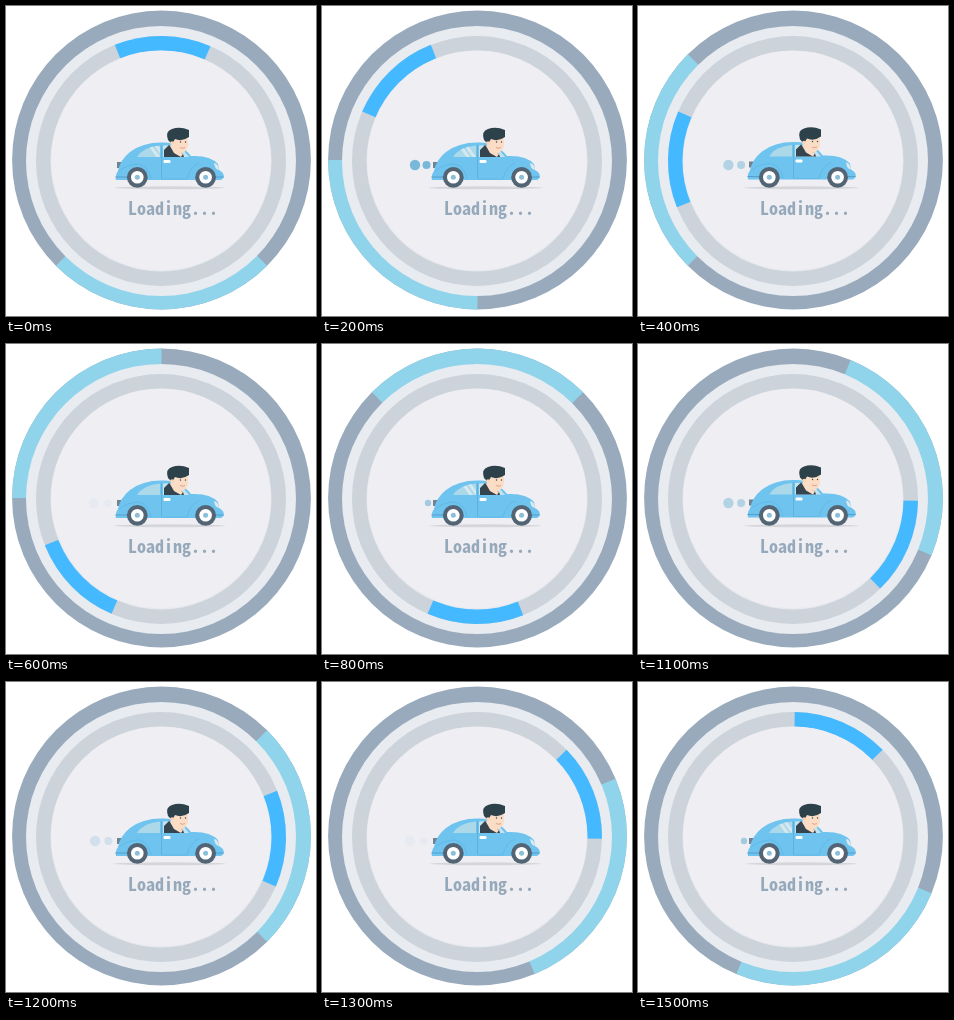
An HTML page with a canvas for the animation above (1600 ms loop, 310 px wide and 310 px high).

```html
<!DOCTYPE html>
<html lang="en">
<head>
<meta charset="utf-8">
<title>Loading</title>
<style>
  html, body { margin: 0; width: 100%; height: 100%; overflow: hidden; background: #fff; }
  canvas { display: block; width: 310px; height: 310px; }
</style>
</head>
<body>
<canvas id="stage"></canvas>
<script>
const STEP = 100, STEPS = 16, TURN = 22.5, PUFF_CYCLE = 7;
const canvas = document.getElementById('stage');
const ctx = canvas.getContext('2d');
const ratio = window.devicePixelRatio || 1;
canvas.width = canvas.height = 310 * ratio;
ctx.scale(ratio, ratio);

function disc(x, y, r, color) {
  ctx.fillStyle = color;
  ctx.beginPath();
  ctx.arc(x, y, r, 0, Math.PI * 2);
  ctx.fill();
}

function shape(path, color) {
  ctx.fillStyle = color;
  ctx.fill(new Path2D(path));
}

function line(path, color, width) {
  ctx.strokeStyle = color;
  ctx.lineWidth = width;
  ctx.stroke(new Path2D(path));
}

// Angles are in degrees, clockwise from the top.
function sector(x, y, r, middle, span, color) {
  const rad = a => (a - 90) * Math.PI / 180;
  ctx.fillStyle = color;
  ctx.beginPath();
  ctx.moveTo(x, y);
  ctx.arc(x, y, r, rad(middle - span / 2), rad(middle + span / 2));
  ctx.fill();
}

function drawRings(n) {
  disc(155.5, 154, 149.4, '#98aabb');
  sector(155.5, 154, 149.4, 180 + n * TURN, 90, '#8fd4eb');
  disc(155, 155, 135, '#e8ebf0');
  disc(155, 155, 125, '#ccd3da');
  sector(155, 155, 125, 0.8 - n * TURN, 45, '#45b9ff');
  disc(155, 155, 110.5, '#e6e9ee');
  disc(155, 154.5, 109.8, '#efeef3');
}

function drawPuffs(phase) {
  if (phase === 0) return;
  ctx.save();
  if (phase === 1) {
    ctx.globalAlpha = 0.65;
    disc(106, 159, 3.2, '#78b8d8');
  } else {
    const age = phase - 2;
    ctx.globalAlpha = [1, 0.75, 0.5, 0.25, 0.06][age];
    disc(93 - age * 1.3, 159, 5.2, '#78b8d8');
    disc(104.5 - age * 0.7, 159, 4, '#78b8d8');
  }
  ctx.restore();
}

function drawWheel(x) {
  disc(x, 171.3, 10.4, '#536574');
  disc(x, 171.3, 6.3, '#fff');
  disc(x, 171.3, 2.5, '#8bbfd9');
}

function drawDriver() {
  shape('M158 151 L158 144 L163 139 L168 144 L177 148 L178 151Z', '#35454f');
  shape('M164 132 L182 132 L182 139 Q181 146 175 147 Q168 147 165 140Z', '#fbdcc5');
  shape('M164 140 Q168 141 171 145 L177 148 L175 151 L168 147Z', '#fbdcc5');
  shape('M162 134 Q159 125 166 123 Q174 120 183 124 L183 131 Q176 136 169 133 L166 138Z', '#2d414b');
  disc(166, 137, 1.8, '#fbd3b6');
  disc(174.5, 136, 0.7, '#35454f');
  disc(179.5, 136, 0.7, '#35454f');
  line('M174 141.5 Q176.5 143 179 141.5', '#d9927f', 0.8);
}

function drawCar(phase) {
  const spread = [0, 0.5, 2, 2, 2, 1, 0.5][phase];
  ctx.fillStyle = '#d5d6da';
  ctx.beginPath();
  ctx.ellipse(163.5, 181.8, 55.5 + spread, 1.5, 0, 0, Math.PI * 2);
  ctx.fill();

  const lift = phase === 3 || phase === 4 ? -0.5 : 0;
  ctx.save();
  ctx.translate(0, lift);
  shape('M111 156 H116 V162 H111Z', '#718391');
  shape('M110 174 Q109 169 112 165 Q114 154 124 146 Q137 136 157 136.5 Q174 136 185 150 Q204 149 212 158 L213 164 Q219 167 217.5 172 L215 174Z', '#6ec3ef');
  const rearWindow = new Path2D('M131 151 Q137 141 154 139.5 V151Z');
  ctx.fillStyle = '#abd9e9';
  ctx.fill(rearWindow);
  if (phase < 4) {
    ctx.save();
    ctx.clip(rearWindow);
    ctx.translate(-phase * 3, 0);
    line('M143 138 L153 152 M149 138 L159 152', '#d5e8ef', 3);
    ctx.restore();
  }
  shape('M157 151 V139.5 Q174 138 183 151Z', '#c6e2ec');
  drawDriver();
  line('M155.5 139 V173', '#58acd9', 0.8);
  line('M156 173 H181 Q184 160 193 157', '#60b6e4', 0.8);
  line('M113 165 Q122 158 133 158 Q143 161 145 173', '#60b6e4', 0.8);
  ctx.fillStyle = '#fff';
  ctx.beginPath();
  ctx.roundRect(157.5, 154, 7, 3, 1.2);
  ctx.fill();
  shape('M208 157 Q212 157 213 164 Q209 164 208 157Z', '#dce9ed');
  line('M109.5 171 H121 M209 171 H217.5', '#559fc9', 1);
  ctx.restore();

  drawWheel(131.3);
  drawWheel(199.6);
}

function drawLabel() {
  ctx.font = 'bold 18px "Noto Sans Mono CJK SC", "Noto Sans Mono CJK JP", "Noto Sans CJK SC", monospace';
  ctx.fillStyle = '#96a9ba';
  ctx.fillText('Loading...', 122, 209);
}

function draw(now) {
  const n = Math.floor(now / STEP) % STEPS;
  const phase = n % PUFF_CYCLE;
  ctx.fillStyle = '#fff';
  ctx.fillRect(0, 0, 310, 310);
  drawRings(n);
  drawPuffs(phase);
  drawCar(phase);
  drawLabel();
}

function tick() {
  draw(performance.now());
  requestAnimationFrame(tick);
}
tick();
</script>
</body>
</html>
```
